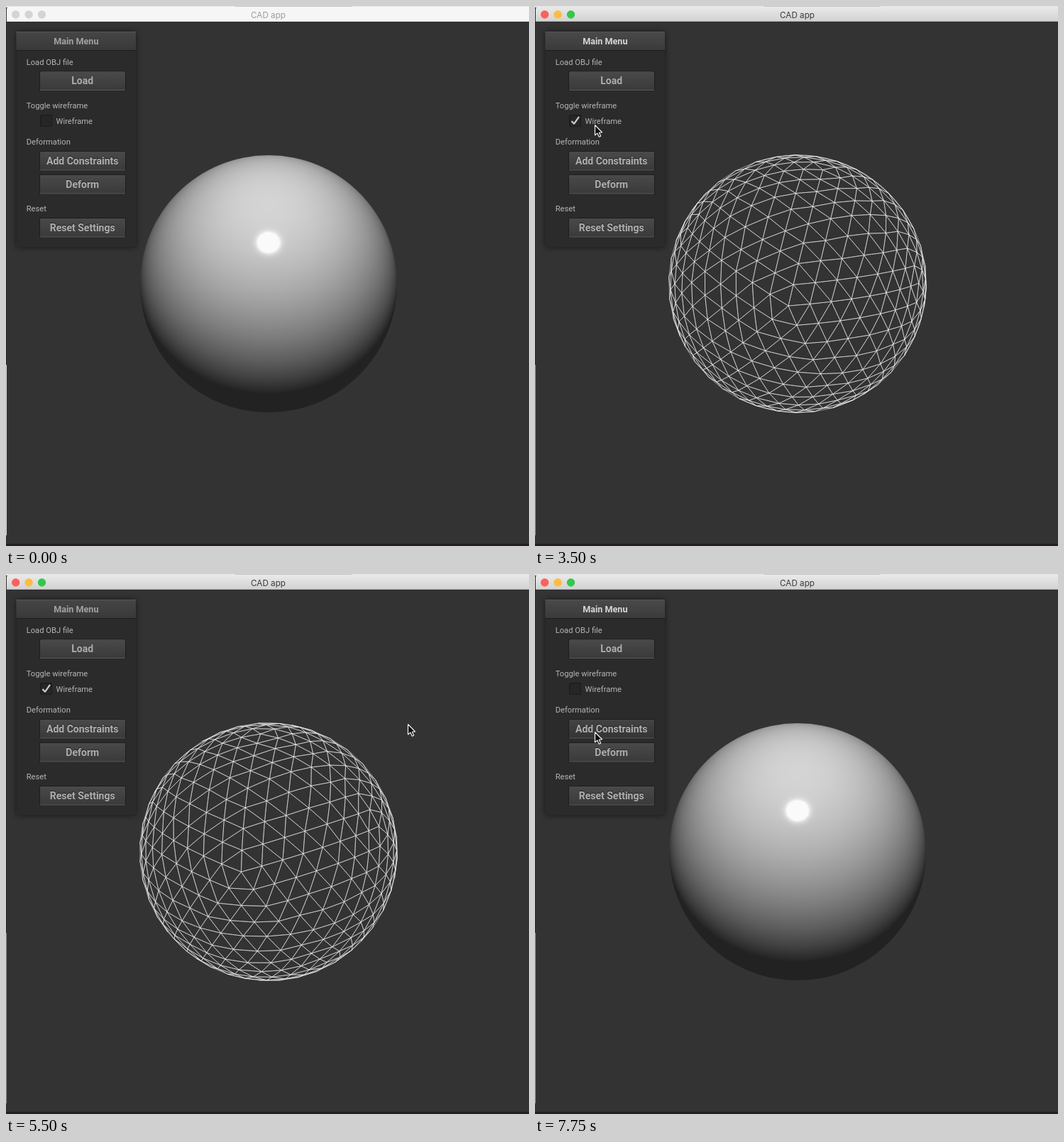
Animation of 737 by 760 pixels, one loop 8000 ms. Source, as an HTML page with a canvas:

```html
<!DOCTYPE html>
<html>
<head>
<meta charset="utf-8">
<style>
  html, body { margin: 0; width: 737px; height: 760px; overflow: hidden; background: #333; }
  canvas { display: block; }
</style>
</head>
<body>
<canvas id="stage" width="737" height="760"></canvas>
<script>
const ctx = document.getElementById('stage').getContext('2d');
const LOOP = 8000, STEP = 250;
const CX = 370, CY = 391, FOCAL = 889.6, CAMERA = 5;
const RADIUS = FOCAL / Math.sqrt(CAMERA ** 2 - 1);
const LIGHT = [0, -3, 5];

// time, x, y of the pointer tip
const POINTER = [
  [1500, 418, 135], [2000, 400, 260], [2500, 330, 300], [2750, 230, 230], [3000, 120, 180],
  [3250, 85, 167], [3750, 85, 167], [4000, 330, 210], [4250, 673, 250], [4500, 651, 240],
  [5000, 616, 226], [5500, 567, 211], [6250, 470, 200], [6500, 400, 195], [6750, 200, 180],
  [7000, 93, 165], [7500, 93, 165], [7750, 85, 222]
];
// time, pole x, pole y (from the centre), twist in degrees
const POSE = [[4500, -13, 31, -4.6], [5500, -38.6, 28.2, -15.9], [6250, -62, 10, -32.3]];

const dot = (a, b) => a[0] * b[0] + a[1] * b[1] + a[2] * b[2];
const sub = (a, b) => a.map((v, i) => v - b[i]);
const unit = a => a.map(v => v / Math.hypot(...a));
const grey = v => `rgb(${v},${v},${v})`;

function sample(keys, t) {
  const next = keys.findIndex(k => k[0] > t);
  if (next < 0) return keys[keys.length - 1].slice(1);
  if (next === 0) return keys[0].slice(1);
  const a = keys[next - 1], b = keys[next], f = (t - a[0]) / (b[0] - a[0]);
  return a.map((v, i) => v + (b[i] - v) * f).slice(1);
}

// Point of the unit sphere seen at an offset from the screen centre
function unproject(x, y) {
  const q = (x * x + y * y) / FOCAL ** 2 + 1;
  const s = (CAMERA - Math.sqrt(Math.max(0, CAMERA ** 2 - q * (CAMERA ** 2 - 1)))) / q;
  return [x * s / FOCAL, y * s / FOCAL, CAMERA - s];
}

function project([x, y, z]) {
  const k = FOCAL / (CAMERA - z);
  return [CX + x * k, CY + y * k];
}

function icosphere(levels) {
  const ring = (z, shift) => [0, 1, 2, 3, 4].map(k => {
    const a = (k + shift) * Math.PI * 0.4;
    return [Math.cos(a) * 2 / Math.sqrt(5), Math.sin(a) * 2 / Math.sqrt(5), z];
  });
  const up = ring(1 / Math.sqrt(5), 0), low = ring(-1 / Math.sqrt(5), 0.5);
  let faces = [];
  for (let k = 0; k < 5; k++) {
    const n = (k + 1) % 5;
    faces.push([[0, 0, 1], up[k], up[n]], [up[k], low[k], up[n]],
               [low[k], low[n], up[n]], [[0, 0, -1], low[n], low[k]]);
  }
  const mid = (a, b) => unit(a.map((v, i) => v + b[i]));
  while (levels--) {
    faces = faces.flatMap(([a, b, c]) => {
      const ab = mid(a, b), bc = mid(b, c), ca = mid(c, a);
      return [[a, ab, ca], [ab, b, bc], [ca, bc, c], [ab, bc, ca]];
    });
  }
  return faces;
}
const mesh = icosphere(3);

function shadeSphere() {
  const size = 368, half = size / 2;
  const canvas = document.createElement('canvas');
  canvas.width = canvas.height = size;
  const c = canvas.getContext('2d'), img = c.createImageData(size, size);
  for (let i = 0; i < size * size; i++) {
    const n = unproject(i % size + 0.5 - half, Math.floor(i / size) + 0.5 - half);
    const l = unit(sub(LIGHT, n)), view = unit(sub([0, 0, CAMERA], n));
    const diffuse = Math.max(0, dot(n, l));
    const mirror = n.map((v, j) => 2 * diffuse * v - l[j]);
    const shine = diffuse && Math.max(0, dot(mirror, view)) ** 128;
    const v = Math.min(250, 34 + 178 * diffuse + 255 * shine);
    img.data.set([v, v, v, 255], i * 4);
  }
  c.putImageData(img, 0, 0);
  return canvas;
}
const shaded = shadeSphere();

function drawSolid() {
  ctx.save();
  ctx.beginPath();
  ctx.arc(CX, CY, RADIUS - 0.5, 0, 7);
  ctx.clip();
  ctx.drawImage(shaded, CX - shaded.width / 2, CY - shaded.height / 2);
  ctx.restore();
}

function drawWireframe(t) {
  const [px, py, degrees] = sample(POSE, t);
  const [x0, y0, z0] = unproject(px, py), axis = [-y0, x0, 0];
  const co = Math.cos(degrees * Math.PI / 180), si = Math.sin(degrees * Math.PI / 180);
  // Twist about z, then tilt z onto the pole
  const rotate = ([x, y, z]) => {
    const v = [x * co - y * si, x * si + y * co, z];
    const k = dot(axis, v) / (1 + z0);
    return [
      v[0] * z0 + axis[1] * v[2] + axis[0] * k,
      v[1] * z0 - axis[0] * v[2] + axis[1] * k,
      v[2] * z0 + axis[0] * v[1] - axis[1] * v[0]
    ];
  };
  ctx.beginPath();
  for (const face of mesh) {
    const tri = face.map(rotate);
    const centre = [0, 1, 2].map(i => (tri[0][i] + tri[1][i] + tri[2][i]) / 3);
    if (centre[2] * CAMERA < Math.hypot(...centre)) continue;
    tri.forEach((v, i) => ctx[i ? 'lineTo' : 'moveTo'](...project(v)));
    ctx.closePath();
  }
  ctx.strokeStyle = '#f0f0f0';
  ctx.lineWidth = 0.55;
  ctx.lineJoin = 'bevel';
  ctx.stroke();
}

function box(x, y, w, h, fill, radius = 0) {
  ctx.fillStyle = fill;
  ctx.beginPath();
  ctx.roundRect(x, y, w, h, radius);
  ctx.fill();
}

function gradient(y, h, top, bottom) {
  const g = ctx.createLinearGradient(0, y, 0, y + h);
  g.addColorStop(0, grey(top));
  g.addColorStop(1, grey(bottom));
  return g;
}

function text(str, x, y, font, color, align = 'left') {
  ctx.font = font;
  ctx.fillStyle = color;
  ctx.textAlign = align;
  ctx.textBaseline = 'alphabetic';
  ctx.fillText(str, x, y);
}

function drawWindow(active) {
  box(0, 0, 737, 760, '#333');
  box(0, 0, 737, 2, '#e4e4e4');
  box(323, 0, 164, 1, '#c4c4c4');
  box(0, 22, 1, 483, '#2a2a2a');
  box(0, 505, 1, 240, active ? '#8c8c8c' : '#d8d8d8');
  box(0, 757, 737, 3, '#241f21');
  box(1, 1, 736, 21, active ? gradient(1, 21, 234, 209) : '#f6f6f6', [4, 0, 0, 0]);
  if (active) box(1, 21, 736, 1, '#b4b4b4');
  const dots = active ? ['#fc605c', '#fdbc40', '#34c84a'] : ['#d4d4d4', '#d4d4d4', '#d4d4d4'];
  dots.forEach((color, i) => box(8 + 18.4 * i, 6.3, 11.4, 11.4, color, 5.7));
  text('CAD app', 369.5, 16.5, '11.7px Inter, sans-serif', active ? '#3a3a3a' : '#9c9c9c', 'center');
}

function button(label, y, hover) {
  box(47, y - 0.5, 122, 28, '#1d1d1d', 2);
  box(48, y + 0.5, 120, 26.5, '#5c5c5c', 1.5);
  box(48, y + 0.5, 120, 25.5, hover ? gradient(y, 26, 68, 52) : gradient(y, 26, 74, 58), 1.5);
  const font = 'bold 14px Roboto, sans-serif';
  text(label, 107.7, y + 17.6, font, '#202020', 'center');
  text(label, 107.7, y + 18.4, font, '#b0b0b0', 'center');
}

function drawPanel(focused, checked, hover) {
  ctx.save();
  ctx.shadowColor = 'rgba(0,0,0,.55)';
  ctx.shadowBlur = 9;
  box(14.5, 36, 168.5, 303.5, '#2b2b2b', 1.5);
  ctx.restore();
  box(14.5, 36, 168.5, 27, focused ? gradient(36, 27, 74, 58) : gradient(36, 27, 70, 56), 1.5);
  box(14.5, 36, 168.5, 1, '#555');
  box(14.5, 62, 168.5, 1, '#1d1d1d');
  text('Main Menu', 98.8, 53.5, 'bold 12.6px Roboto, sans-serif', focused ? '#d6d6d6' : '#a2a2a2', 'center');

  const label = (str, x, y) => text(str, x, y, '11.2px Roboto, sans-serif', '#b6b6b6');
  label('Load OBJ file', 28.7, 82.5);
  label('Toggle wireframe', 28.7, 143.5);
  label('Wireframe', 70.5, 165.7);
  label('Deformation', 28.7, 195);
  label('Reset', 28.7, 289.3);
  button('Load', 92);
  button('Add Constraints', 204.5, hover);
  button('Deform', 237.5);
  button('Reset Settings', 298.5);

  box(48, 153, 17, 17, '#1c1c1c', 2.5);
  box(49.5, 154.5, 14.5, 14.5, '#262626', 2);
  if (checked) {
    ctx.beginPath();
    ctx.moveTo(51.5, 162);
    ctx.lineTo(55, 165.8);
    ctx.lineTo(62, 155.8);
    ctx.strokeStyle = '#cdcdcd';
    ctx.lineWidth = 2.2;
    ctx.stroke();
  }
}

const arrow = new Path2D('M0 0V14.5L3.4 11.4L5.8 16.8L8.2 15.8L5.8 10.5H10.2Z');

function drawPointer(x, y) {
  ctx.save();
  ctx.translate(x - 0.5, y + 0.5);
  ctx.lineWidth = 1.2;
  ctx.fillStyle = '#0a0a0a';
  ctx.strokeStyle = '#f2f2f2';
  ctx.fill(arrow);
  ctx.stroke(arrow);
  ctx.restore();
}

function draw(t) {
  const wire = t >= 3500 && t < 7250;
  const focused = (t >= 3500 && t < 4250) || t >= 7250;
  drawWindow(t >= 500);
  if (wire) drawWireframe(t);
  else drawSolid();
  drawPanel(focused, wire, t >= 7750);
  if (t >= 1500) drawPointer(...sample(POINTER, t));
}

const start = performance.now();
function tick() {
  const t = (performance.now() - start) % LOOP;
  draw(Math.floor(t / STEP) * STEP);
  requestAnimationFrame(tick);
}
tick();
</script>
</body>
</html>
```
